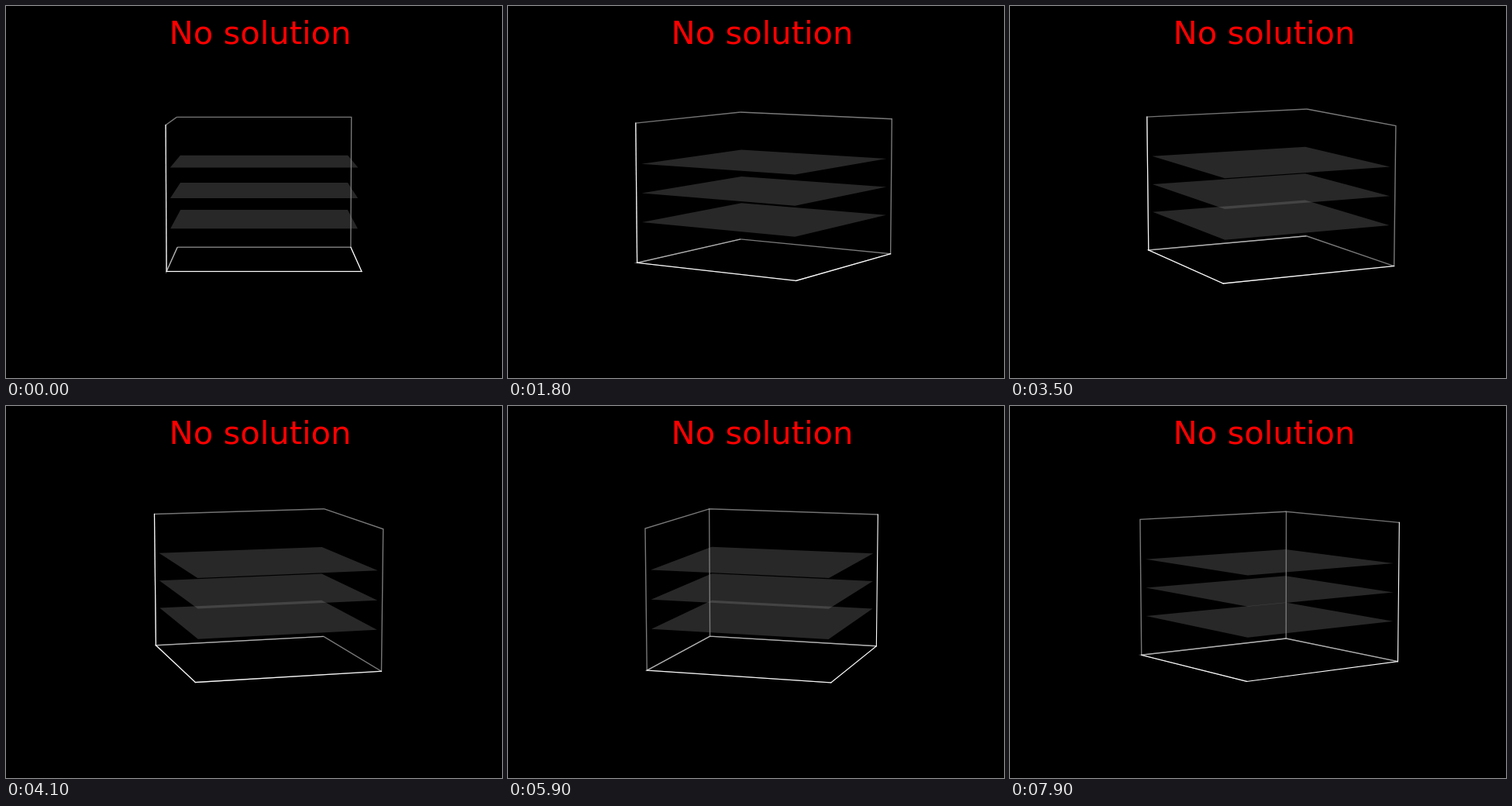
Animation of 640 by 480 pixels, one loop 8 s. Source, as an HTML page with a canvas:

```html
<!DOCTYPE html>
<html lang="en">
<head>
<meta charset="utf-8">
<title>No solution</title>
<style>
  html, body { margin: 0; width: 100%; height: 100%; overflow: hidden; background: #000; }
  canvas { display: block; }
</style>
</head>
<body>
<canvas id="stage" width="640" height="480"></canvas>
<script>
const ctx = document.getElementById('stage').getContext('2d');

const STEP_MS = 100, STEPS = 80;
const SCALE = 369.6 / 0.185;          // pixels per unit of projected space
const CX = 333, CY = 237.4, DIST = 10;
const UNIT = 1.829464 / Math.sqrt(41);
const SHEET = 2 * UNIT;               // half width of the sheets
const BOX = SHEET * 25 / 24;          // half width of the box
const BOX_Z = BOX * 3 / 4;
const SHEET_Z = [-0.1865, 0, 0.1865];
const PANE_WIDTH = 100 / 72, AXIS_WIDTH = 80 / 72;

const gray = (level, alpha) => `rgba(${level},${level},${level},${alpha})`;
const rad = deg => deg * Math.PI / 180;

function camera(step) {
  const azim = step * 180 / 99;
  const elev = step < 50 ? 5 + step * 5 / 49 : 10 - (step - 50) * 5 / 49;
  const ca = Math.cos(rad(azim)), sa = Math.sin(rad(azim));
  const ce = Math.cos(rad(elev)), se = Math.sin(rad(elev));
  const project = ([x, y, z]) => {
    const near = x * ca + y * sa;
    const k = SCALE / (DIST - near * ce - z * se);
    return [CX + (y * ca - x * sa) * k, CY - (z * ce - near * se) * k];
  };
  return { project, front: azim < 90 ? 1 : -1 };
}

function trace(points, project) {
  ctx.beginPath();
  for (const p of points) ctx.lineTo(...project(p));
}

function draw(step) {
  const { project, front } = camera(step);
  // Corners are given as signs of x, y and z.
  const stroke = (corners, color, width, cap) => {
    trace(corners.map(([x, y, z]) => [x * BOX, y * BOX, z * BOX_Z]), project);
    ctx.strokeStyle = color;
    ctx.lineWidth = width;
    ctx.lineCap = cap;
    ctx.stroke();
  };
  const pane = (corners, level) => stroke(corners, gray(level, 0.5), PANE_WIDTH, 'butt');
  const axis = (a, b) => stroke([a, b], '#fff', AXIS_WIDTH, 'square');

  ctx.fillStyle = '#000';
  ctx.fillRect(0, 0, 640, 480);

  // Each pane outline is open on its fourth side.
  const back = -front;
  pane([[back, -1, -1], [back, 1, -1], [back, 1, 1], [back, -1, 1]], 242);
  pane([[-1, -1, -1], [1, -1, -1], [1, -1, 1], [-1, -1, 1]], 230);
  pane([[-1, -1, -1], [1, -1, -1], [1, 1, -1], [-1, 1, -1]], 236);

  axis([-1, 1, -1], [1, 1, -1]);
  axis([front, -1, -1], [front, 1, -1]);
  axis([front, -1, -1], [front, -1, 1]);

  ctx.fillStyle = gray(128, 0.31);
  for (const z of SHEET_Z) {
    trace([[-1, -1], [1, -1], [1, 1], [-1, 1]].map(([x, y]) => [x * SHEET, y * SHEET, z]), project);
    ctx.fill();
  }

  ctx.fillStyle = '#f00';
  ctx.font = '41.667px "DejaVu Sans", sans-serif';
  ctx.textAlign = 'center';
  ctx.fillText('No solution', 328, 49);
}

const start = performance.now();
function tick() {
  draw(Math.floor((performance.now() - start) / STEP_MS) % STEPS);
  requestAnimationFrame(tick);
}
tick();
</script>
</body>
</html>
```
